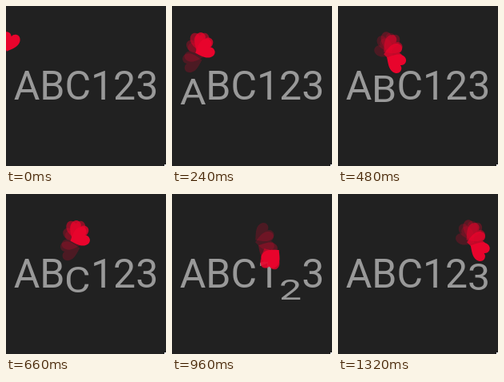
These frames come from a looping animation (200 px wide and 200 px high, 1380 ms). An HTML page with a canvas:

```html
<!DOCTYPE html>
<html lang="en">
<head>
<meta charset="utf-8">
<title>Bouncing heart</title>
<style>
  html, body { margin: 0; width: 100%; height: 100%; overflow: hidden; background: #212121; }
  #stage { position: relative; width: 200px; height: 200px; overflow: hidden; }
  #word { font: 400 50px/200px Roboto, sans-serif; color: #999; text-align: center; white-space: nowrap; }
  #word span { display: inline-block; }
  canvas { position: absolute; left: 0; top: 0; }
  #corner { position: absolute; right: 0; bottom: 0; width: 2px; height: 2px; background: #fff; }
</style>
</head>
<body>
<div id="stage">
  <div id="word"></div>
  <div id="corner"></div>
  <canvas width="200" height="200"></canvas>
</div>
<script>
const LOOP = 1380, STEP = 60, HOP = 210, TURN = 2 * Math.PI;
const TRAIL = [[100, .22], [80, .22], [60, .3], [40, .55], [20, .8], [0, 1]];
const heart = new Path2D(
  "M0 12C-4 8-12 3-12-4C-12-9-9-11.5-6-11.5C-3-11.5-1-10 0-7.5" +
  "C1-10 3-11.5 6-11.5C9-11.5 12-9 12-4C12 3 4 8 0 12Z");
const ctx = document.querySelector("canvas").getContext("2d");
const word = document.getElementById("word");

const letters = [..."ABC123"].map(ch => {
  const span = document.createElement("span");
  span.textContent = ch;
  word.append(span);
  return span;
});

function drawHeart(t, alpha) {
  const x = 4.5 + .131 * t + 5 * Math.sin(TURN * t / LOOP);
  const y = 63.5 + 18.5 * Math.cos(TURN * (t - 100) / HOP);
  ctx.save();
  ctx.globalAlpha = alpha;
  ctx.translate(x, y);
  ctx.rotate(.3 + TURN * t / HOP);
  ctx.fill(heart);
  ctx.restore();
}

// 1 at the moment of impact, easing back to 0
function press(age) {
  return age < 0 || age > 180 ? 0 : 1 - (age / 180) ** 1.25;
}

function draw(t) {
  letters.forEach((el, i) => {
    const p = press(t - 120 - HOP * i);
    el.style.transform = p ? `translateY(${20 * p}px) scaleY(${1 - .3 * p})` : "none";
  });
  ctx.clearRect(0, 0, 200, 200);
  ctx.fillStyle = "#e8042c";
  for (const [lag, alpha] of TRAIL) {
    if (t >= lag) drawHeart(t - lag, alpha);
  }
}

let start;
function tick(now) {
  start ??= now;
  draw(Math.floor((now - start) % LOOP / STEP) * STEP);
  requestAnimationFrame(tick);
}
draw(0);
requestAnimationFrame(tick);
</script>
</body>
</html>
```
